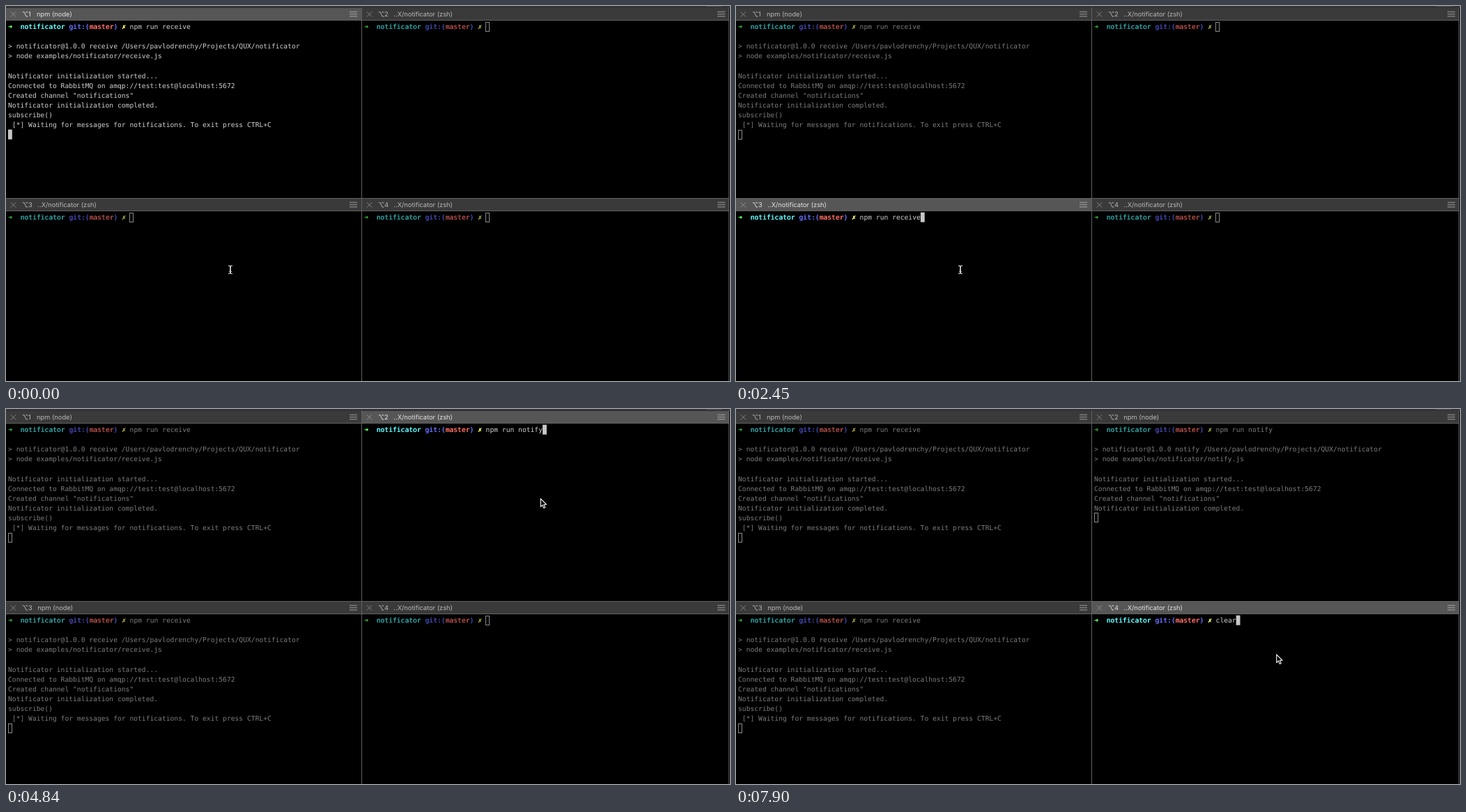
Recreate the animation shown at these times as an HTML page with a canvas. Size 1039 by 539 pixels, loop 8000 ms.

```html
<!DOCTYPE html>
<html lang="en">
<head>
<meta charset="utf-8">
<title>Four terminal panes</title>
<style>
  html, body { margin: 0; width: 100%; height: 100%; overflow: hidden; background: #000; }
  canvas { display: block; }
</style>
</head>
<body>
<canvas id="stage" width="1039" height="539"></canvas>
<script>
const ctx = document.getElementById('stage').getContext('2d');
const LOOP = 8000, CELL = 5.82, ROW = 14.09, TICK = 130;
const MONO = '9.667px "DejaVu Sans Mono", monospace';
const SANS = '9.3px Inter, sans-serif';
const LINE = '#606060';
const BRIGHT = { text: '#d0d0d0', green: '#5ffa68', cyan: '#60fdff', blue: '#6871ff', red: '#ff6e67', yellow: '#fffc67' };
const DIM = { text: '#7c7c7c', green: '#35a03c', cyan: '#2f9fa1', blue: '#4349b0', red: '#ad4c46', yellow: '#a3a13e' };

const prompt = [
  ['➜', 0, 'green'], ['notificator', 3, 'cyan'], ['git:(', 15, 'blue'],
  ['master', 20, 'red'], [')', 26, 'blue'], ['✗', 28, 'yellow']
];
const HISTORY = ['clear', 'npm run notify', 'npm run receive'];
const script = (name, ...extra) => [
  '',
  `> notificator@1.0.0 ${name} /Users/pavlodrenchy/Projects/QUX/notificator`,
  `> node examples/notificator/${name}.js`,
  '',
  'Notificator initialization started...',
  'Connected to RabbitMQ on amqp://test:test@localhost:5672',
  'Created channel "notifications"',
  'Notificator initialization completed.',
  ...extra
];
const receive = script('receive', 'subscribe()',
  ' [*] Waiting for messages for notifications. To exit press CTRL+C');
const notify = script('notify');

// focus: pane is clicked; keys: history recalls; run: Enter; boot: first output.
const panes = [
  { id: 1, x: 0, y: 0, focus: 0, keys: [0, 0, 0], run: -2000, boot: -1500, output: receive },
  { id: 2, x: 511, y: 0, focus: 4160, keys: [4540, 4840], run: 6400, boot: 6900, output: notify },
  { id: 3, x: 0, y: 274, focus: 390, keys: [1080, 1490, 2450], run: 2920, boot: 3540, output: receive },
  { id: 4, x: 511, y: 274, focus: 7460, keys: [7900], run: LOOP, boot: LOOP, output: notify }
];

function activePane(t) {
  return panes.filter(p => p.focus <= t).sort((a, b) => b.focus - a.focus)[0];
}

// The shell's job name is polled once a second.
function titleOf(pane, t) {
  if (t < pane.run) return '..X/notificator (zsh)';
  const poll = Math.ceil((pane.run - 160) / 1000) * 1000 + 160;
  return t < poll ? 'npm (zsh)' : 'npm (node)';
}

// The header comes at once, then the log follows line by line.
function linesOf(pane, t) {
  if (t < pane.boot) return [];
  const since = t - pane.boot - 280;
  return pane.output.slice(0, since < 0 ? 4 : 5 + Math.floor(since / 40));
}

// Pointer stops: time, x, y.
const stops = [
  [3000, 322, 379], [3250, 741, 129], [3380, 775.5, 104], [3770, 766.5, 128],
  [6500, 766.5, 128], [6630, 735, 190], [6890, 791, 322], [7020, 775, 352]
];

function pointerAt(t) {
  const now = Math.floor(t / TICK) * TICK;
  const next = stops.findIndex(s => s[0] > now);
  if (next < 1) return stops[next ? stops.length - 1 : 0].slice(1);
  const [t0, x0, y0] = stops[next - 1], [t1, x1, y1] = stops[next];
  const k = (now - t0) / (t1 - t0);
  return [x0 + (x1 - x0) * k, y0 + (y1 - y0) * k];
}

function rect(x, y, w, h, color) {
  ctx.fillStyle = color;
  ctx.fillRect(x, y, w, h);
}

function path(points, color, width, fill) {
  ctx.beginPath();
  for (const [x, y] of points) ctx.lineTo(x, y);
  if (fill) {
    ctx.closePath();
    ctx.fillStyle = fill;
    ctx.fill();
  }
  ctx.strokeStyle = color;
  ctx.lineWidth = width;
  ctx.stroke();
}

function text(str, x, y, color, font) {
  ctx.font = font;
  ctx.fillStyle = color;
  ctx.fillText(str, x, y);
}

function titleBar({ id, x, y }, title, active) {
  const left = x ? 511 : 0, right = x ? 1037 : 510;
  const ink = active ? '#e4e4e4' : '#b9b9b9', icon = active ? '#8f8f8f' : '#808080';
  rect(left, y + 3, right - left, 17, active ? '#565656' : '#3a3a3a');
  rect(left, y + 20, right - left, 1, LINE);
  path([[x + 6.8, y + 8.2], [x + 14.2, y + 15.6]], icon, 1);
  path([[x + 14.2, y + 8.2], [x + 6.8, y + 15.6]], icon, 1);
  path([[x + 23.8, y + 8.8], [x + 26.2, y + 8.8], [x + 29, y + 15], [x + 31.4, y + 15]], ink, 0.9);
  path([[x + 28.2, y + 8.8], [x + 31.4, y + 8.8]], ink, 0.9);
  text(id, x + 32, y + 15.2, ink, SANS);
  text(title, x + (id === 1 ? 44 : 45.3), y + 15.2, ink, SANS);
  const menu = right - (x ? 16 : 17);
  for (let i = 0; i < 3; i++) rect(menu, y + 7.7 + i * 3.2, 11, 1.4, icon);
}

function drawPane(pane, t, active) {
  const colors = active ? BRIGHT : DIM;
  const left = pane.x + 3, top = pane.y + 22.6;
  const put = (str, col, row, color, shift = 0) =>
    text(str, left + col * CELL + shift, top + row * ROW + 10.6, colors[color], MONO);

  titleBar(pane, titleOf(pane, t), active);
  for (const [str, col, color] of prompt) {
    put(str, col, 0, color);
    put(str, col, 0, color, 0.5);
  }
  const command = HISTORY[pane.keys.filter(k => k <= t).length - 1] || '';
  put(command, 30, 0, 'text');
  const lines = linesOf(pane, t);
  lines.forEach((line, i) => put(line, 0, i + 1, 'text'));

  const typing = t < pane.run;
  const x = left + (typing ? 30 + command.length : 0) * CELL;
  const y = top + (typing ? 0 : lines.length + 1) * ROW;
  if (active) {
    rect(x, y, CELL, ROW, '#c7c7c7');
  } else {
    ctx.strokeStyle = '#8a8a8a';
    ctx.lineWidth = 1;
    ctx.strokeRect(Math.floor(x) + 0.5, Math.round(y) + 0.5, 5, 13);
  }
}

function drawPointer(t) {
  ctx.save();
  ctx.translate(...pointerAt(t));
  if (t < stops[0][0] + TICK) {
    for (const side of [-1, 1]) {
      path([[3 * side, -5.7], [side, -5.5], [0, -4.5], [0, 4.5], [side, 5.5], [3 * side, 5.7]], '#e8e8e8', 1.1);
    }
    path([[-1.8, 2.5], [1.8, 2.5]], '#e8e8e8', 0.8);
  } else {
    path([[0.8, 1], [0.8, 12.4], [3.4, 10.1], [5.2, 14.4], [7.2, 13.6], [5.4, 9.4], [8.9, 9.1]], '#fff', 1.1, '#000');
  }
  ctx.restore();
}

function draw(t) {
  rect(0, 0, 1039, 539, '#000');
  rect(0, 0, 1039, 3, '#333');
  rect(1005, 0, 22, 1, '#505050');
  const active = activePane(t);
  for (const pane of panes) drawPane(pane, t, pane === active);
  rect(0, 276, 1038, 1, LINE);
  for (const x of [510, 1037]) rect(x, 2, 1, 537, LINE);
  drawPointer(t);
}

ctx.textRendering = 'geometricPrecision';
const start = performance.now();
function tick() {
  draw((performance.now() - start) % LOOP);
  requestAnimationFrame(tick);
}
tick();
</script>
</body>
</html>
```
